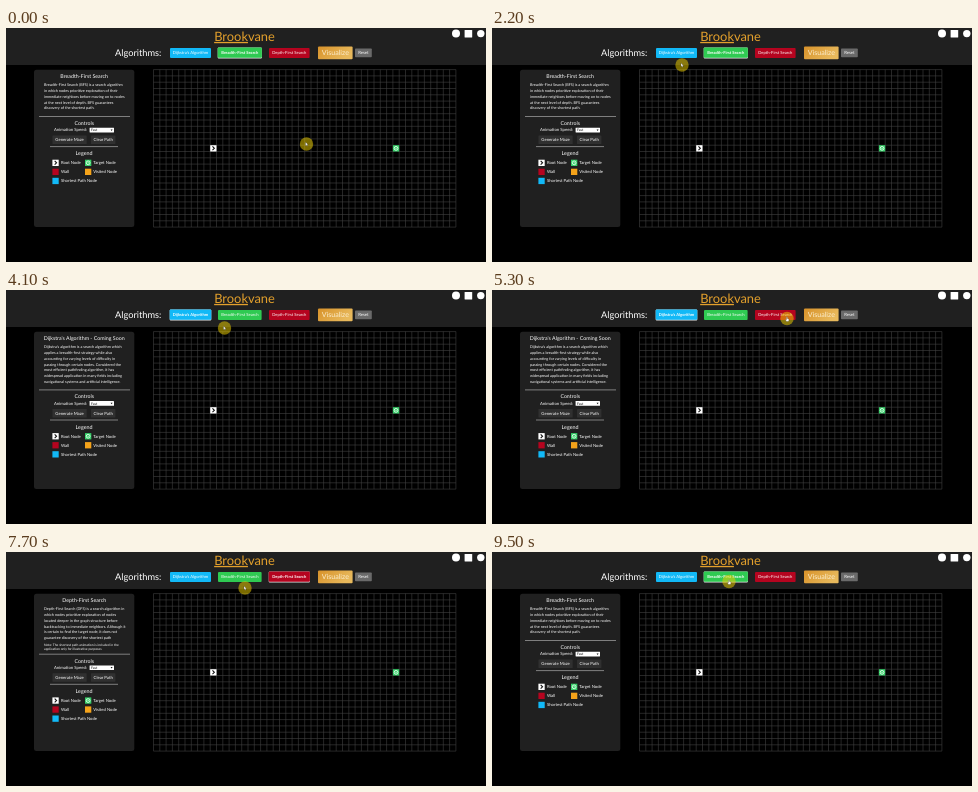
These frames come from a looping animation (480 by 234 pixels, 10 s). An HTML page:

```html
<!DOCTYPE html>
<html lang="en">
<head>
<meta charset="utf-8">
<title>Search visualizer</title>
<style>
html, body { margin: 0; width: 100%; height: 100%; overflow: hidden; background: #000; }
svg { display: block; width: 100vw; height: 100vh; }
text { font-family: Lato, "Open Sans", sans-serif; text-rendering: geometricPrecision; white-space: pre; }
</style>
</head>
<body>
<svg id="stage" viewBox="0 0 480 234"></svg>
<script>
const NS = 'http://www.w3.org/2000/svg';
const stage = document.getElementById('stage');

function add(parent, tag, attrs, content) {
  const el = document.createElementNS(NS, tag);
  for (const key in attrs) el.setAttribute(key, attrs[key]);
  if (content) el.textContent = content;
  parent.appendChild(el);
  return el;
}
const box = (parent, x, y, width, height, fill, rx = 0) =>
  add(parent, 'rect', { x, y, width, height, fill, rx });
const line = (parent, d, stroke, width) =>
  add(parent, 'path', { d, stroke, 'stroke-width': width, fill: 'none' });

// y is the middle of the capitals
function label(parent, content, x, y, size, attrs = {}) {
  return add(parent, 'text', { x, y: y + size * 0.35, 'font-size': size, fill: '#fff', ...attrs }, content);
}
const centered = (parent, content, x, y, size, attrs) =>
  label(parent, content, x, y, size, { 'text-anchor': 'middle', ...attrs });

const COLORS = { blue: '#12b9f7', green: '#2fca52', red: '#b5041f', orange: '#f5a31a' };

function rootNode(parent, x, y, s) {
  box(parent, x, y, s, s, '#fff');
  line(parent, `M${x + s * .36} ${y + s * .2}L${x + s * .66} ${y + s * .5}L${x + s * .36} ${y + s * .8}`, '#111', s * .17);
}
function targetNode(parent, x, y, s) {
  box(parent, x, y, s, s, '#35cf68');
  add(parent, 'circle', { cx: x + s / 2, cy: y + s / 2, r: s * .3, fill: 'none', stroke: '#e9fff0', 'stroke-width': s * .14 });
  add(parent, 'circle', { cx: x + s / 2, cy: y + s / 2, r: s * .09, fill: '#e9fff0' });
}

function drawHeader() {
  box(stage, 0, 0, 480, 37, '#202020');
  const title = add(stage, 'text', { x: 238.5, y: 12.9, 'font-size': 12.9, 'text-anchor': 'middle', fill: '#e3a02c' });
  add(title, 'tspan', { style: 'text-decoration:underline' }, 'Brook');
  add(title, 'tspan', {}, 'vane');
  label(stage, 'Algorithms:', 109, 24.7, 9.25);

  add(stage, 'circle', { cx: 450, cy: 5.6, r: 4, fill: '#fff' });
  box(stage, 458.6, 1.9, 7.6, 7.6, '#fff', .6);
  add(stage, 'circle', { cx: 474.8, cy: 5.6, r: 3.7, fill: '#fff' });

  const gold = add(add(stage, 'defs', {}), 'linearGradient', { id: 'gold', x2: 1, y2: .4 });
  add(gold, 'stop', { offset: 0, 'stop-color': '#d8922a' });
  add(gold, 'stop', { offset: 1, 'stop-color': '#e8b95c' });
  box(stage, 312, 18.6, 34.6, 12.6, 'url(#gold)', 1);
  centered(stage, 'Visualize', 329.3, 25, 7.1, { fill: '#fbeccb' });
  box(stage, 349, 20.4, 16.8, 8.8, '#6a6a6a', .8);
  centered(stage, 'Reset', 357.4, 24.8, 4.3);
}

function drawGrid() {
  const cell = 6.3, cols = 48, rows = 25, x0 = 147.5, y0 = 41.6;
  let d = '';
  for (let c = 0; c <= cols; c++) d += `M${x0 + c * cell} ${y0}v${rows * cell}`;
  for (let r = 0; r <= rows; r++) d += `M${x0} ${y0 + r * cell}h${cols * cell}`;
  line(stage, d, '#404040', .6);
  rootNode(stage, x0 + 9 * cell, y0 + 12 * cell, cell);
  targetNode(stage, x0 + 38 * cell, y0 + 12 * cell, cell);
}

const MODES = {
  dijkstra: {
    name: "Dijkstra's Algorithm", title: "Dijkstra's Algorithm - Coming Soon",
    x: 164, width: 41, color: COLORS.blue, shift: 11.4,
    lines: ["Dijkstra's algorithm is a search algorithm which", 'applies a breadth-first strategy while also',
      'accounting for varying levels of difficulty in', 'passing through certain nodes. Considered the',
      'most efficient pathfinding algorithm, it has', 'widespread application in many fields including',
      'navigational systems and artificial intelligence.']
  },
  bfs: {
    name: 'Breadth-First Search', x: 212, width: 43.6, color: COLORS.green, shift: 0,
    lines: ['Breadth-First Search (BFS) is a search algorithm', 'in which nodes prioritize exploration of their',
      'immediate neighbors before moving on to nodes', 'at the next level of depth. BFS guarantees',
      'discovery of the shortest path.']
  },
  dfs: {
    name: 'Depth-First Search', x: 263, width: 40.6, color: COLORS.red, shift: 13.7,
    lines: ['Depth-First Search (DFS) is a search algorithm in', 'which nodes prioritize exploration of nodes',
      'located deeper in the graph structure before', 'backtracking to immediate neighbors. Although it',
      'is certain to find the target node, it does not', 'guarantee discovery of the shortest path'],
    note: ['Note: The shortest path animation is included in the', 'application only for illustrative purposes']
  }
};
const LINE_STEP = 5.75;

function drawButton(mode) {
  const { x, width, color, name } = mode;
  box(stage, x, 20, width, 10, color, 1);
  mode.plain = centered(stage, name, x + width / 2, 24.9, 4.15);
  mode.picked = add(stage, 'g', {});
  box(mode.picked, x - .3, 19.5, width + .6, 11.1, '#e6e6e6', 1);
  box(mode.picked, x - .3, 19.5, width + .6, 10.2, color, 1);
  centered(mode.picked, name, x + width / 2, 24.7, 4.05, { 'font-weight': 700 });
}

function drawControls(parent, shift) {
  const g = add(parent, 'g', { transform: `translate(0 ${shift})` });
  line(g, 'M33 88.5H124', '#a8a8a8', .7);
  centered(g, 'Controls', 78.2, 95, 5.25);
  label(g, 'Animation Speed:', 48, 102, 4.25);
  box(g, 83.6, 99.7, 24.4, 4.7, '#fff', .3);
  label(g, 'Fast', 85, 102.1, 3.5, { fill: '#111' });
  add(g, 'path', { d: 'M104.6 101.4h2l-1 1.5z', fill: '#111' });
  for (const [name, x, w] of [['Generate Maze', 46.5, 34.2], ['Clear Path', 85, 24.4]]) {
    box(g, x, 107.5, w, 8.6, '#303030', .6);
    centered(g, name, x + w / 2, 111.8, 4.25);
  }
  line(g, 'M44 118.6H112', '#a8a8a8', .7);
  centered(g, 'Legend', 78, 125.5, 5.4);
  rootNode(g, 46.4, 131.7, 6.3);
  targetNode(g, 79, 131.7, 6.3);
  box(g, 46.4, 140.7, 6.3, 6.3, COLORS.red);
  box(g, 79, 140.7, 6.3, 6.3, COLORS.orange);
  box(g, 46.4, 149.8, 6.3, 6.3, COLORS.blue);
  ['Root Node', 'Wall', 'Shortest Path Node'].forEach((s, i) => label(g, s, 55, 134.9 + i * 9.05, 4.2));
  ['Target Node', 'Visited Node'].forEach((s, i) => label(g, s, 87.2, 134.9 + i * 9.05, 4.2));
}

function drawPanel(mode) {
  const g = mode.panel = add(stage, 'g', {});
  centered(g, mode.title || mode.name, 78.2, 48, 5.3);
  mode.lines.forEach((s, i) => label(g, s, 38, 57.1 + i * LINE_STEP, 3.8));
  (mode.note || []).forEach((s, i) => label(g, s, 38, 93.2 + i * 4.1, 3.3));
  drawControls(g, mode.shift);
}

drawHeader();
drawGrid();
box(stage, 28, 41.7, 100.3, 157.3, '#202020', 2.5);
for (const key in MODES) {
  drawButton(MODES[key]);
  drawPanel(MODES[key]);
}

const cursor = add(stage, 'g', {});
add(cursor, 'circle', { r: 6.7, fill: '#ebcd00', 'fill-opacity': .52 });
const arrow = add(cursor, 'path', {
  d: 'M-1-2V1.7L-.1 .9L.5 2.2L1.1 1.9L.5 .7H1.6Z', fill: '#fff', stroke: '#222', 'stroke-width': .25
});
const hand = add(cursor, 'path', {
  d: 'M-.5-1.6Q0-2.2 .4-1.6V0L1.9 .4V2L1.3 3H-.6L-1.7 1L-.5 1.1Z', fill: '#fff', stroke: '#222', 'stroke-width': .25
});

// [ms, x, y]
const ROUTE = [
  [0, 300.5, 116], [800, 300.5, 116], [1300, 283, 103], [1900, 229, 61.5], [2200, 190, 37],
  [3000, 188, 28.5], [3800, 188, 28.5], [4100, 218.5, 38], [4500, 262, 45], [4900, 296, 31],
  [5200, 295, 28.5], [6600, 295, 28.5], [7200, 262, 43], [7700, 239, 36], [8100, 237, 29.5], [10000, 237, 29.5]
];
const PICKS = [[0, 'bfs'], [3100, 'dijkstra'], [5500, 'dfs'], [8400, 'bfs']];
const LOOP = 10000, TICK = 100;

function slope(i, axis) {
  const a = ROUTE[i], b = ROUTE[i + 1];
  return a && b ? (b[axis] - a[axis]) / (b[0] - a[0]) : 0;
}
// Harmonic mean keeps the curve from overshooting its points
function tangent(i, axis) {
  const p = slope(i - 1, axis), q = slope(i, axis);
  return p * q > 0 ? 2 * p * q / (p + q) : 0;
}
function along(t, axis) {
  let i = 0;
  while (i < ROUTE.length - 2 && t >= ROUTE[i + 1][0]) i++;
  const a = ROUTE[i], b = ROUTE[i + 1], span = b[0] - a[0];
  const u = (t - a[0]) / span, v = 1 - u;
  return a[axis] * v * v * (1 + 2 * u) + b[axis] * u * u * (3 - 2 * u)
    + span * u * v * (tangent(i, axis) * v - tangent(i + 1, axis) * u);
}

const show = (el, on) => el.setAttribute('visibility', on ? 'visible' : 'hidden');

function draw(now) {
  const t = Math.floor((now % LOOP) / TICK) * TICK;
  const picked = PICKS.filter(p => p[0] <= t).pop()[1];
  const x = along(t, 1), y = along(t, 2);
  let hovering = false;
  for (const key in MODES) {
    const mode = MODES[key], on = key === picked;
    show(mode.panel, on);
    show(mode.picked, on);
    show(mode.plain, !on);
    if (x > mode.x && x < mode.x + mode.width && y < 30.5) hovering = true;
  }
  cursor.setAttribute('transform', `translate(${x} ${y})`);
  show(arrow, !hovering);
  show(hand, hovering);
}

const start = performance.now();
function loop() {
  draw(performance.now() - start);
  requestAnimationFrame(loop);
}
loop();
</script>
</body>
</html>
```
